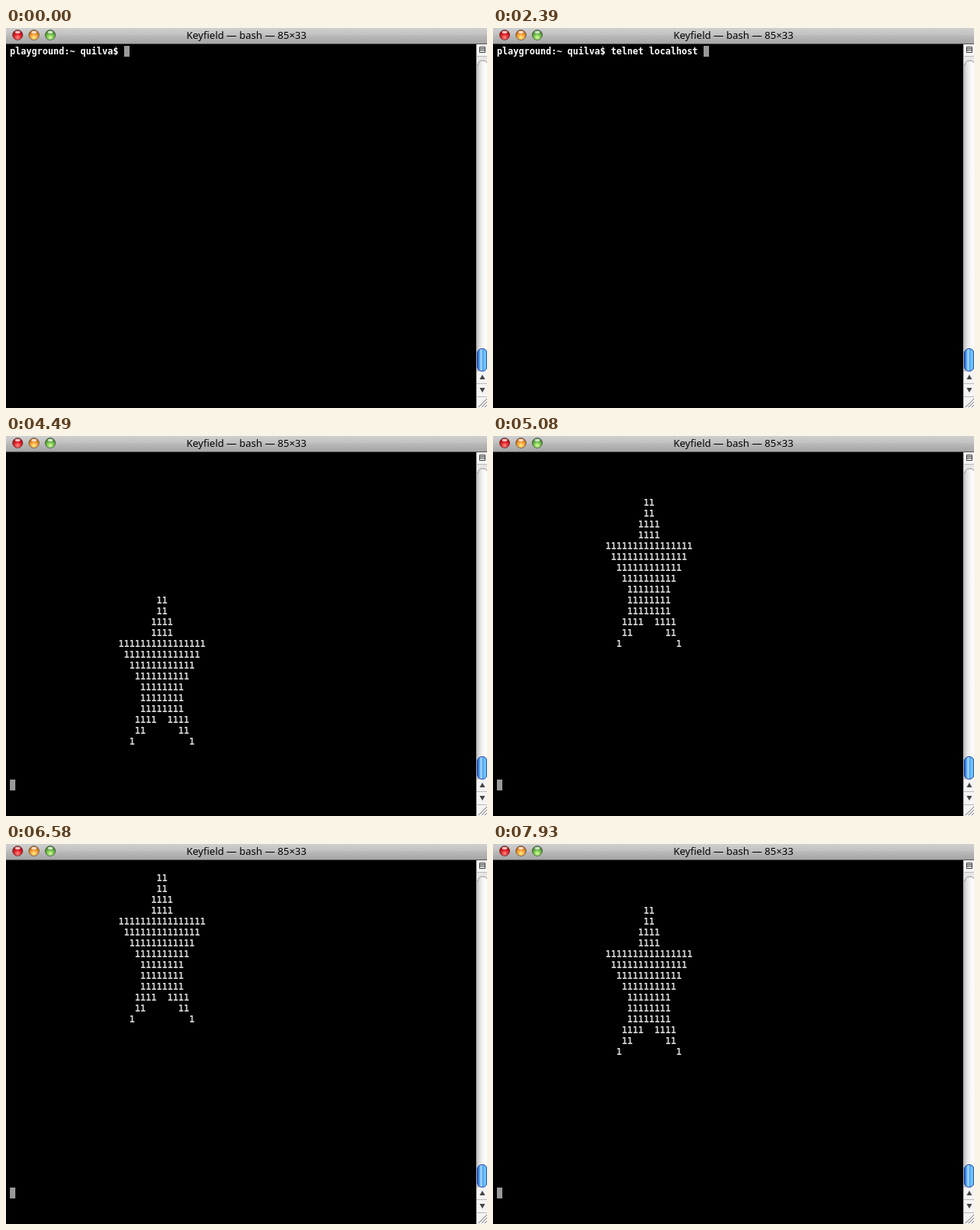
Write an HTML page that moves like this. It is 619 px wide and 490 px high and loops after 8 s.

```html
<!DOCTYPE html>
<html lang="en">
<head>
<meta charset="utf-8">
<style>
  html, body { margin: 0; width: 619px; height: 490px; overflow: hidden; background: #000; }
  svg { position: absolute; left: 0; top: 0; }
  .title { font: 13px "Noto Sans", "Open Sans", sans-serif; }
  #screen, #cursor { position: absolute; left: 5px; top: 23px; }
  #screen { margin: 0; font: bold 11.627px/14px "DejaVu Sans Mono", monospace; }
  #cursor { width: 7px; height: 14px; background: #999; }
</style>
</head>
<body>
<svg width="619" height="490">
  <defs>
    <linearGradient id="bar" x2="0" y2="1">
      <stop stop-color="#cfcfcf"/><stop offset=".42" stop-color="#c2c2c2"/>
      <stop offset=".5" stop-color="#b9b9b9"/><stop offset="1" stop-color="#a6a6a6"/>
    </linearGradient>
    <linearGradient id="track">
      <stop stop-color="#b4b4b4"/><stop offset=".3" stop-color="#dedede"/>
      <stop offset=".6" stop-color="#f4f4f4"/><stop offset="1" stop-color="#fff"/>
    </linearGradient>
    <linearGradient id="thumb">
      <stop stop-color="#1746b4"/><stop offset=".2" stop-color="#4c9af0"/>
      <stop offset=".42" stop-color="#b4e0ff"/><stop offset=".55" stop-color="#4fa4f4"/>
      <stop offset=".85" stop-color="#7fd0ff"/><stop offset="1" stop-color="#2a62c8"/>
    </linearGradient>
    <radialGradient id="red" cy=".75" r=".75">
      <stop stop-color="#ff8d86"/><stop offset=".45" stop-color="#e2242a"/><stop offset="1" stop-color="#8c0a10"/>
    </radialGradient>
    <radialGradient id="amber" cy=".75" r=".75">
      <stop stop-color="#fff08a"/><stop offset=".45" stop-color="#f8a23a"/><stop offset="1" stop-color="#a8500c"/>
    </radialGradient>
    <radialGradient id="green" cy=".75" r=".75">
      <stop stop-color="#d8ffa0"/><stop offset=".45" stop-color="#74c24c"/><stop offset="1" stop-color="#2c6a1c"/>
    </radialGradient>
  </defs>

  <rect width="619" height="20" fill="url(#bar)"/>
  <rect y="20" width="619" height="1" fill="#555"/>
  <g id="buttons"></g>
  <text class="title" x="309.5" y="14" text-anchor="middle">Keyfield — bash — 85×33</text>

  <rect x="605" y="21" width="14" height="469" fill="#f4f4f4"/>
  <rect x="605" y="36" width="14" height="407" fill="url(#track)"/>
  <path d="M605 36.5h14M605 458.5h14M605 475.5h14" stroke="#bbb"/>
  <path d="M605.5 21V490" stroke="#aaa"/>
  <path d="M606 37h13v8q-2-3-6-3t-6 5h-1z" fill="#e6e6e6"/>
  <path d="M607 48q1-6 6-6t6 3" fill="none" stroke="#999"/>
  <path d="M609.5 24.5h7v7h-7z" fill="#ddd" stroke="#444"/>
  <path d="M610 26.5h6M610 28.5h6" stroke="#555"/>
  <rect x="606.5" y="413.5" width="12.5" height="29" rx="6" fill="url(#thumb)" stroke="#173f9c"/>
  <path d="M609.5 453l3.5-6 3.5 6zM609.5 464l3.5 6 3.5-6z" fill="#444"/>
  <path d="M608 489l11-11M612 489l7-7M616 489l3-3" stroke="#777"/>
</svg>
<pre id="screen"></pre>
<div id="cursor"></div>
<script>
const LOOP = 8000, ROWS = 30, CENTRE = 28;
const PROMPT = 'playground:~ quilva$ ', COMMAND = 'telnet localhost 60000';

// [time, characters typed so far]
const typing = [
  [750, 1], [900, 3], [1050, 4], [1200, 6], [1350, 7], [1500, 8], [1650, 9],
  [1800, 11], [1950, 13], [2100, 14], [2250, 16], [2390, 17],
  [2840, 18], [2990, 19], [3290, 20], [3440, 21], [3590, 22]
];

// [row width, gap in the middle]
const star = [
  [2, 0], [2, 0], [4, 0], [4, 0], [16, 0], [14, 0], [12, 0], [10, 0],
  [8, 0], [8, 0], [8, 0], [10, 2], [10, 6], [12, 10]
].map(([width, gap]) => {
  const side = '1'.repeat((width - gap) / 2);
  return ' '.repeat(CENTRE - width / 2) + side + ' '.repeat(gap) + side;
});

const screen = document.getElementById('screen');
const cursor = document.getElementById('cursor');

document.getElementById('buttons').innerHTML = ['red', 'amber', 'green'].map((name, i) => {
  const x = 15 + 21 * i;
  return `<circle cx="${x}" cy="9" r="6.5" fill="url(#${name})" stroke="#0006"/>
    <ellipse cx="${x}" cy="5.2" rx="3.4" ry="1.8" fill="#fffb"/>`;
}).join('');

function show(text, color, column, row) {
  if (screen.textContent !== text) screen.textContent = text;
  screen.style.color = color;
  cursor.style.transform = `translate(${column * 7}px, ${row * 14}px)`;
}

function showTyping(t) {
  const typed = typing.filter(([time]) => time <= t).pop()?.[1] ?? 0;
  show(PROMPT + COMMAND.slice(0, typed), '#fff', PROMPT.length + typed, 0);
}

// The star scrolls up three lines per step and wraps around.
function showStar(t) {
  const start = t < 5230 ? 4190 : 5230;
  const step = Math.max(0, Math.floor((t - start) / 150) + (t < 5230 ? 1 : 8));
  const top = 22 - 3 * step + 3 * ROWS;
  const lines = Array(ROWS).fill('');
  star.forEach((line, i) => lines[(top + i) % ROWS] = line);
  // A leading newline would be lost only in markup, not in textContent.
  show(lines.join('\n'), '#d8d8d8', 0, ROWS);
}

function frame() {
  const t = performance.now() % LOOP;
  (t < 3890 ? showTyping : showStar)(t);
  requestAnimationFrame(frame);
}
frame();
</script>
</body>
</html>
```
